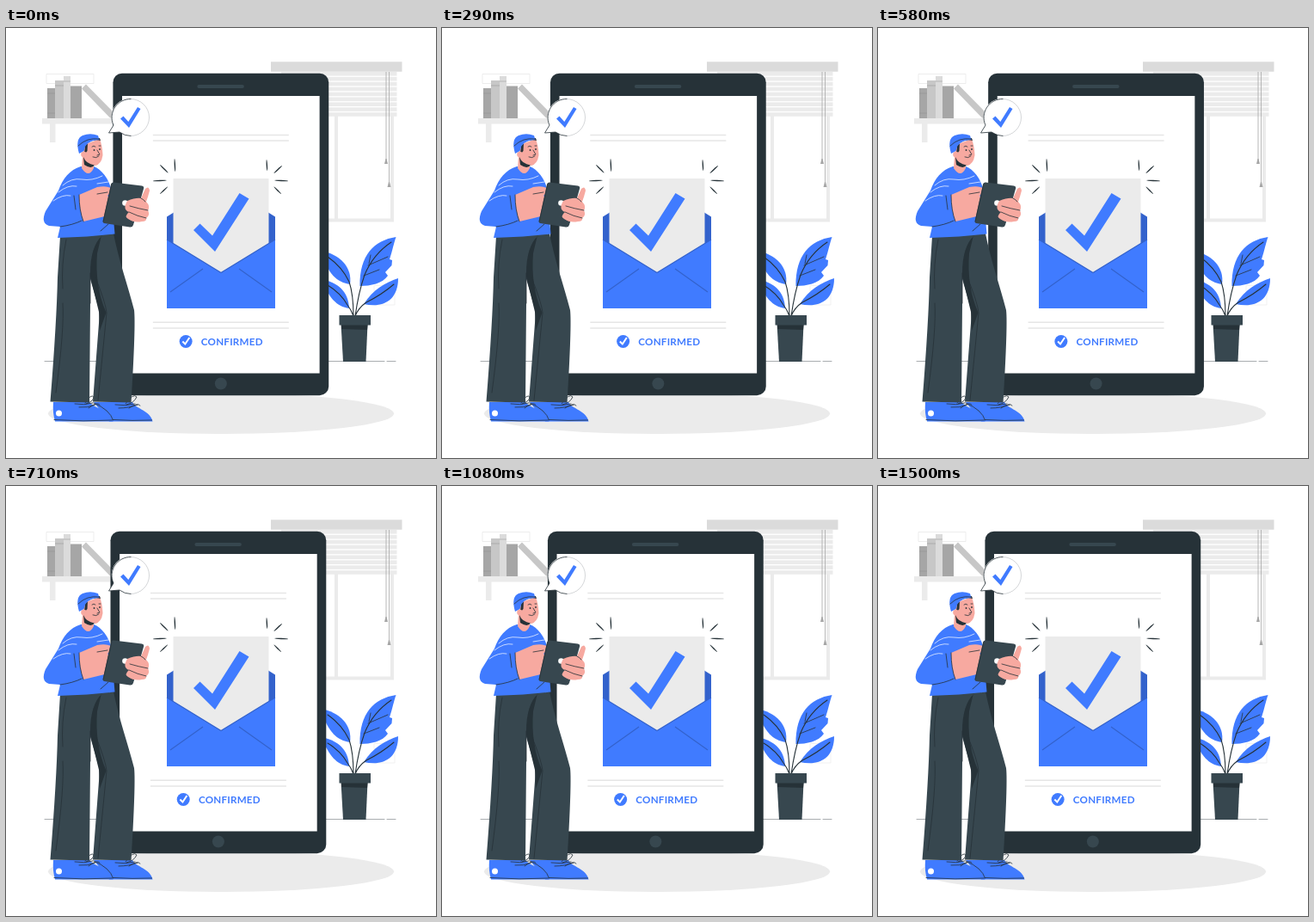
An HTML page that plays this animation: 500x500 px, repeating every 1.54 s.

```html
<!DOCTYPE html>
<html lang="en">
<head>
<meta charset="utf-8">
<title>Confirmed</title>
<style>
  html, body { margin: 0; width: 100%; height: 100%; overflow: hidden; background: #fff; }
  svg { display: block; width: 100%; height: 100%; }
  text { font: 700 11.6px Lato, sans-serif; letter-spacing: .25px; }
  .blue { fill: #407bff; }
  .dark { fill: #263238; }
  .slate { fill: #37474f; }
  .skin { fill: #f7a9a0; }
  .pale { fill: #ebebeb; }
  .line { fill: none; stroke: #263238; stroke-width: .8; stroke-linecap: round; stroke-linejoin: round; }
  .white { fill: none; stroke: #fff; stroke-width: .7; stroke-linecap: round; }
</style>
</head>
<body>
<svg viewBox="0 0 500 500">
  <ellipse class="pale" cx="250" cy="448.300" rx="201" ry="23.700"/>
  <path class="line" style="stroke-width:.4" d="M45 387.500H440M443 387.500H453"/>

  <g id="shelf">
    <path fill="none" stroke="#e6e6e6" stroke-width=".7" d="M47 53.500H102V64.500H47Z"/>
    <path class="pale" d="M42 105H127V111.500H42ZM51 111.500H57.500V133H51Z"/>
    <path fill="#a6a6a6" d="M48 70H57V105H48ZM75 67.500H88V105H75Z"/>
    <path fill="#c7c7c7" d="M57 61H67V105H57ZM88 70.500L93 65.500L126 99V104.500H121Z"/>
    <path fill="#dbdbdb" d="M67 56H75V105H67Z"/>
    <path fill="none" stroke="#8f8f8f" stroke-width=".5" d="M48 76H57M48 99H57M57 67H67M67 62H75"/>
  </g>

  <g id="window">
    <path fill="none" stroke="#ebebeb" stroke-width="4" d="M322 100V223.500H449V100M384 100V223"/>
    <g id="blinds" class="pale"></g>
    <path fill="#dbdbdb" d="M308 39.300H460.500V50.700H308Z"/>
    <path fill="none" stroke="#a6a6a6" stroke-width=".8" d="M442 51V154M445.500 51V181"/>
    <path fill="#a6a6a6" d="M441.500 152H442.500L444 158H440ZM445 179H446L447.500 185H443.500Z"/>
  </g>

  <g id="plant">
    <path fill="none" stroke="#ebebeb" stroke-width=".7" d="M428 299.500H452V322H428Z"/>
    <g class="blue">
      <path d="M453.500 243C428 247 411 264 411.500 300C424 300 438 297 444 288L441 284L448.500 276L449 270L446 269C449 260 451 250 453.500 243Z"/>
      <path d="M400 298C385 296 374 286 366 259C388 263 403 278 400 298Z"/>
      <path d="M399 326C384 324 375 313 367 292C386 296 398 306 399 326Z"/>
      <path d="M456 291C441 296 427 304 416 321C438 326 456 317 456 291Z"/>
    </g>
    <path class="line" style="stroke-width:1.100" d="M404 335C404 318 402 304 399 295Q391 278 374 266M404 335Q401 327 397 322Q389 308 374 299M406 335Q410 307 417 287Q427 263 448 249M406 335Q410 325 419 319Q437 310 451 298"/>
    <path class="line" d="M416 288L434 281M421 276L444 266M422 274L424 264"/>
    <path class="slate" d="M389.500 344H420.500L418.500 388H392Z"/>
    <path class="dark" d="M390 345H420.500L420 351L390 350Z"/>
    <path class="slate" d="M387.500 334H424V345.500H387.500Z"/>
  </g>

  <g id="tablet">
    <rect class="dark" x="124.600" y="52.700" width="250.800" height="374.500" rx="10.500"/>
    <path fill="#fff" d="M135.200 79H364.800V401.500H135.200Z"/>
    <rect class="slate" x="222.500" y="66" width="54.500" height="4" rx="2"/>
    <circle class="slate" cx="250" cy="413.500" r="7"/>
    <path stroke="#e6e6e6" stroke-width="1.600" d="M171 124.500H329M171 131H329M171 342.300H329M171 349H329"/>
    <circle class="blue" cx="209.300" cy="364.500" r="7.500"/>
    <path fill="none" stroke="#fff" stroke-width="2" d="M205.500 364.500L208.500 367.500L213.500 360"/>
    <text class="blue" x="227" y="368.700">CONFIRMED</text>
  </g>

  <g id="envelope">
    <path fill="#3362cc" d="M187 219.500L195 214.500H305L313 219.500V260H187Z"/>
    <path class="pale" d="M194.500 175H305.500V260L250 290L194.500 260Z"/>
    <path class="blue" d="M187 246L250 284.500L313 246V326H187Z"/>
    <path fill="none" stroke="#3362cc" stroke-width="1.200" d="M187 246L250 284.500L313 246M191 307L229 280M309 307L271 280"/>
    <path class="blue" d="M218 235L225.500 227.500L240 241.500L271.500 192L282.500 198.500L243 260Z"/>
    <g id="sparks" class="dark"></g>
  </g>

  <g id="bubble">
    <path fill="#fff" d="M125 113L119.500 122L132 121A21.500 21.500 0 1 0 125 113Z"/>
    <path class="line" d="M145 82.500A21.500 21.500 0 0 0 125 113L119.500 122L132 121Q138 125.500 145 125.500"/>
    <path class="line" style="stroke-width:.2" d="M145 82.500A21.500 21.500 0 0 1 145 125.500"/>
    <path class="blue" d="M133 105.500L136.500 102.500L142.300 109L153 92L156.500 94L143 116Z"/>
  </g>

  <g id="man">
    <g id="shoes">
      <path class="blue" d="M102 435H147C151 443 168 445 170.500 457.500H120Z"/>
      <path class="blue" d="M55 435L97 435C104 443 122 445 124.500 457.500H57Q54 447 55 435Z"/>
      <path class="line" d="M56 455.500Q90 458 123.500 456M124.500 455.500Q147 457 169.500 456M102 436Q121 444 124.500 456M80 437Q91 439 101 436M85 441Q95 442 104 438M92 436Q99 425 102 429Q101 435 93 437M96 442Q106 434 109 438M127 438Q139 440 150 437M131 442Q143 442 153 438M139 437Q148 424 152 429Q149 436 140 438M143 442Q153 435 156 439"/>
      <circle cx="61.500" cy="448" r="3.500" fill="#fff"/>
    </g>
    <path class="slate" d="M88 242L125 239C131 270 142 300 149 328Q151 345 145.500 435.500L101 434.500L109 330L96 285Z"/>
    <path class="dark" d="M112 241Q97 254 97 285L108 330L109 352L116.500 331Q103 300 106 262L111 241Z"/>
    <path class="slate" d="M63 242L112 241Q98 254 98 285V320L97 435.500L51.500 434.500Q59 340 60 290Z"/>
    <path class="line" d="M70 246Q64 275 66 303M98 285V320M104 290Q116 320 117 331L107 433M58 424Q68 350 66 320"/>

    <path class="blue" d="M87 161C74 165 66 175 61 189L46 213Q40 227 50 230L63 231L60 244Q95 243 126.500 239.500L122 187C120 176 111 164 102 161Z"/>
    <path class="white" d="M66 183Q76 174 88 176T112 172M61 191Q72 182 82 184M55 201Q66 193 75 195M106 181L119 179"/>
    <path class="line" d="M81 211L79 195M63 231Q78 229 88 224M110 236L119 228"/>

    <path class="skin" d="M89 149L88 163Q96 175 102 163V152Z"/>
    <path class="skin" d="M90 136L109 129Q112 137 112.500 148Q111 158 104 160Q93 158 90 148Z"/>
    <path class="dark" d="M90 150Q93 158 103 159.500Q99 164.500 91 159ZM92 137L95 134L94.500 143L91 147ZM95 133Q103 129 110 131L109 128L97 129Z"/>
    <circle class="skin" cx="90.500" cy="147" r="3.300"/>
    <path class="blue" d="M85 146Q80 129 89 125Q98 121.500 107 125L108.500 130Q98 130 92.500 137L90.500 143Z"/>
    <path class="line" d="M84 137Q94 127 108 129M106 142L109 147L106 148M101 150Q105 152 108 149M100 138Q102 136 104 138M108 137L110 137"/>
    <circle class="dark" cx="102.500" cy="142" r=".9"/>
    <circle class="dark" cx="109" cy="141" r=".9"/>

    <path class="skin" d="M85 194L106 185Q118 183 123 187Q124 191 118 195Q127 202 119 218L90 225Q85 210 85 194Z"/>
    <path class="line" d="M85 194Q85 212 90 225M106 193L118 191"/>
    <path class="slate" d="M125 179.500L158 183.500Q161 184 160 187L148 229Q147 232 144 231.500L114 227Q112 226 113 223L122 182Q123 179 125 179.500Z"/>
    <path class="line" d="M123 181L113 225"/>
    <circle cx="138.500" cy="203.500" r="3.300" fill="#fff"/>
    <path class="skin" d="M141 201Q151 197 157 198L162 187Q166 183 167 189Q165 197 163 202Q168 207 165 212Q168 218 163 221Q164 225 158 225Q149 227 142 222Q137 219 143 214Q135 211 141 201Z"/>
    <path class="line" d="M144 207Q154 210 165 212M143 214Q153 219 163 221M157 198Q160 199 162 202"/>
  </g>
</svg>
<script>
  const LOOP = 1540, STEP = 1000 / 24, SHAKE = 1500;
  const shakeStops = [0, -1, 2, -4, 4, -4, 4, -4, 2, -1, 0];
  const sparks = [
    [196, 152, 196.7, 167], [179, 159, 188.5, 168.5], [171, 178, 187, 177], [179, 193, 188, 184.5],
    [303, 153, 303.7, 166], [321, 160, 311.5, 169], [312, 177, 328, 178], [311.5, 184.5, 320, 193],
  ];
  const byId = id => document.getElementById(id);
  const tablet = byId("tablet");

  byId("blinds").innerHTML = Array.from({ length: 9 }, (_, i) =>
    `<rect x="320" y="${51 + i * 5.9}" width="134.500" height="4.600"/>`).join("");

  // Each spark is a thin lens, pointed at both ends.
  byId("sparks").innerHTML = sparks.map(([x1, y1, x2, y2]) => {
    const length = Math.hypot(x2 - x1, y2 - y1);
    const angle = Math.atan2(y2 - y1, x2 - x1) * 180 / Math.PI;
    return `<ellipse rx="${length / 2}" ry=".7" transform="translate(${(x1 + x2) / 2} ${(y1 + y2) / 2}) rotate(${angle})"/>`;
  }).join("");

  function shakeOffset(ms) {
    const place = (ms % SHAKE) / SHAKE * 10;
    const i = Math.floor(place);
    return shakeStops[i] + (shakeStops[i + 1] - shakeStops[i]) * (place - i);
  }

  // The tablet moves in 24 steps per second, switching on 10 ms ticks.
  function draw() {
    const step = Math.floor((performance.now() % LOOP + 5) / STEP);
    const x = shakeOffset(step % 36 * STEP + 25);
    tablet.setAttribute("transform", `translate(${x.toFixed(2)} 0)`);
    requestAnimationFrame(draw);
  }
  draw();
</script>
</body>
</html>
```
